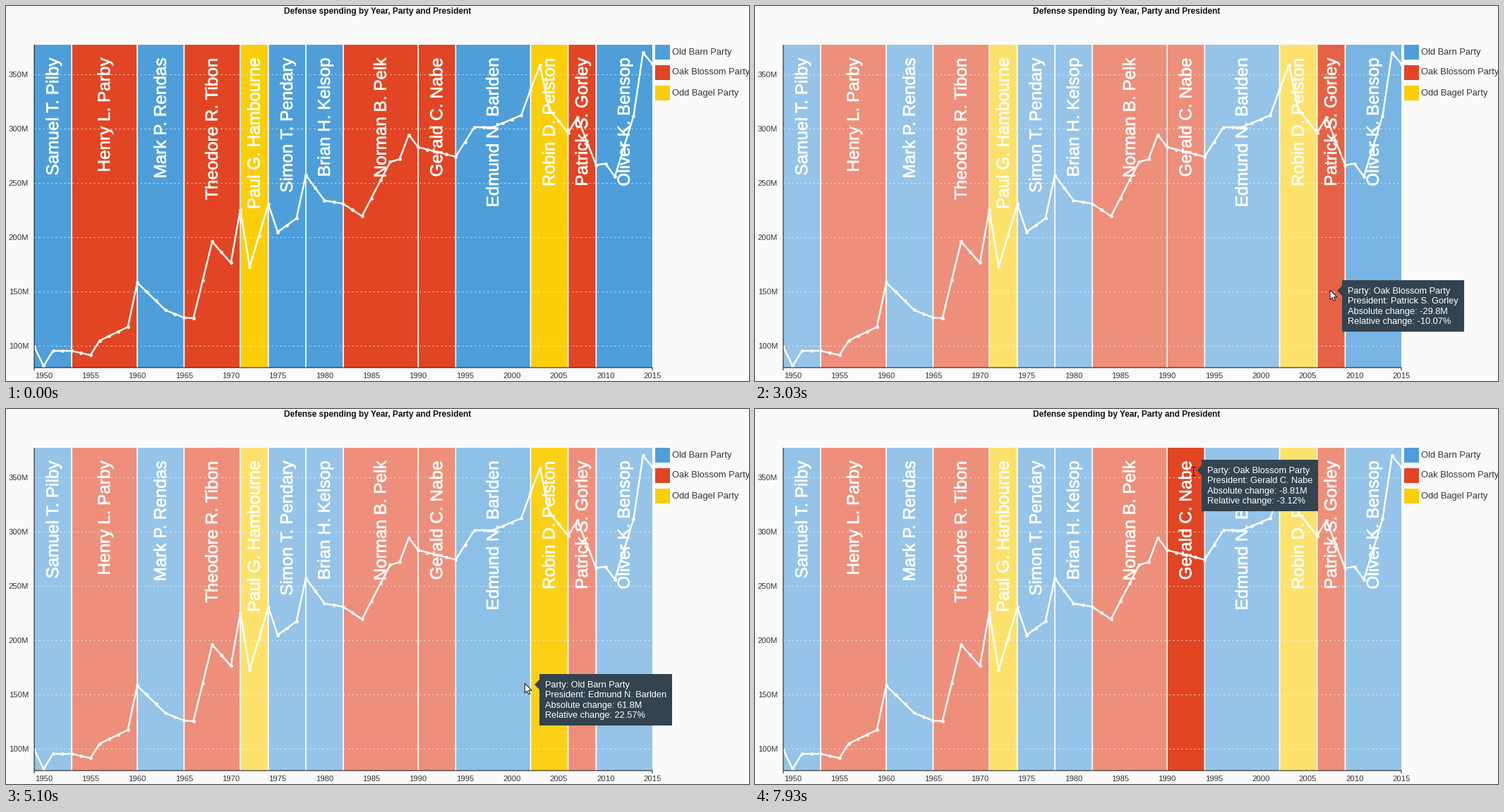
A matplotlib script for the animation above (7.99 s loop, 1053 by 532 pixels).

```python
import numpy as np
import matplotlib.pyplot as plt
from matplotlib.animation import FuncAnimation
from matplotlib.patches import Polygon, Rectangle
from matplotlib.patheffects import withStroke

W, H = 1053, 532
LOOP, STEP = 7990, 47
LEFT, RIGHT, TOP, BOTTOM = 40, 916, 55, 513
FIRST, LAST = 1949, 2015
BLUE, RED, YELLOW = "#4e9eda", "#e14524", "#facf0a"
INK, TEXT, TIP_COLOR = "#111111", "#333333", "#33434f"
DIM, FADE, LAG = 0.6, 400, 45

PARTIES = {BLUE: "Old Barn Party", RED: "Oak Blossom Party",
           YELLOW: "Odd Bagel Party"}

# first year, party colour, president, spending in that year
TERMS = [
    (1949, BLUE, "Samuel T. Pilby", 99),
    (1953, RED, "Henry L. Parby", 95),
    (1960, BLUE, "Mark P. Rendas", 157.8),
    (1965, RED, "Theodore R. Tibon", 125.6),
    (1971, YELLOW, "Paul G. Hambourne", 225),
    (1974, BLUE, "Simon T. Pendary", 229.9),
    (1978, BLUE, "Brian H. Kelsop", 256.8),
    (1982, RED, "Norman B. Pelk", 230.5),
    (1990, RED, "Gerald C. Nabe", 282.63),
    (1994, BLUE, "Edmund N. Barlden", 273.82),
    (2002, YELLOW, "Robin D. Pelston", 335.63),
    (2006, RED, "Patrick S. Gorley", 295.84),
    (2009, BLUE, "Oliver K. Bensop", 266.06),
]

# turning points inside the terms; years between them lie on straight lines
TURNS = {
    1950: 81, 1951: 95, 1955: 91, 1956: 104.5, 1959: 117, 1963: 132.5,
    1966: 125, 1968: 195.5, 1970: 176, 1972: 172.5, 1975: 204.5, 1977: 217,
    1980: 233.5, 1984: 219, 1987: 269, 1988: 271.5, 1989: 294, 1996: 301,
    1998: 301, 2001: 312, 2003: 358, 2004: 317.5, 2007: 310, 2010: 267.5,
    2011: 255.5, 2013: 311.5, 2014: 369.5, LAST: 359.44,
}
spending = sorted({**TURNS, **{t[0]: t[3] for t in TERMS}}.items())

# pointer path: ms, x, y
PATH = np.array([
    (970, 950, 520), (2140, 894, 429), (3030, 815, 403), (4660, 763, 396),
    (5040, 745, 391), (5660, 644, 373), (5980, 609, 362), (7170, 609, 362),
    (7840, 620, 87),
])
ARROW = 0.85 * np.array([
    (0, 0), (0, 16), (3.7, 12.6), (6.3, 18.3), (8.8, 17.2), (6.3, 11.6),
    (11.5, 11.6),
])
IBEAM = np.array([(-3, -6), (3, -6), (0, -6), (0, 6), (-3, 6), (3, 6)])

plt.rcParams["font.family"] = "Liberation Sans"
fig = plt.figure(figsize=(W / 72, H / 72), dpi=72, facecolor="#fafafa")
ax = fig.add_axes([0, 0, 1, 1])
ax.set_xlim(0, W)
ax.set_ylim(H, 0)
ax.axis("off")


def year_x(year):
    return LEFT + (RIGHT - LEFT) * (year - FIRST) / (LAST - FIRST)


def value_y(value):
    return 96.5 + (350 - value) * 1.54


def spent(year):
    return np.interp(year, *zip(*spending))


def pointer(t):
    return np.array([np.interp(t, PATH[:, 0], PATH[:, k]) for k in (1, 2)])


def label(x, y, text, size, color=TEXT, **kw):
    return ax.text(x, y, text, fontsize=size, color=color, va="baseline", **kw)


def box(x, y, w, h, color, z=1):
    return ax.add_patch(Rectangle((x, y), w, h, fc=color, lw=0, zorder=z))


def stroke(xs, ys, color, lw, z, **kw):
    ax.plot(xs, ys, color=color, lw=lw, zorder=z, solid_capstyle="butt", **kw)


# bands with vertical names
box(LEFT, TOP, RIGHT - LEFT, BOTTOM - TOP, "white", 0)
ends = [term[0] for term in TERMS[1:]] + [LAST]
bands = []
for (start, color, name, _), end in zip(TERMS, ends):
    x0, x1 = year_x(start), year_x(end)
    bands.append(box(x0, TOP, x1 - x0, BOTTOM - TOP, color))
    label((x0 + x1) / 2 + 7.5, 74, name, 24.3, "white", ha="right",
          rotation=90, rotation_mode="anchor", zorder=4,
          path_effects=[withStroke(linewidth=0.6, foreground="white")])
    if end < LAST:
        stroke([x1, x1], [TOP, BOTTOM], "white", 1.7, 2, snap=False)

# grid, data line and axes
for value in range(100, 351, 50):
    y = value_y(value)
    stroke([LEFT, RIGHT], [y, y], "white", 1, 3, alpha=0.75,
           linestyle=(0, (2, 4)))
    label(32, y + 4.5, f"{value}M", 11.2, ha="right")
for year in range(1950, LAST + 1, 5):
    label(year_x(year), 528, str(year), 11.2, ha="center")

years = np.arange(FIRST, LAST + 1)
ax.plot(year_x(years), value_y(spent(years)), color="white", lw=2.4,
        marker="o", ms=4.8, mew=0, solid_joinstyle="round", zorder=5)
stroke([LEFT, LEFT], [TOP, BOTTOM + 4], INK, 1, 6, snap=False)
stroke([LEFT, RIGHT, RIGHT], [BOTTOM, BOTTOM, BOTTOM + 4], INK, 1, 6,
       snap=False)

# title and legend
label(526.5, 11, "Defense spending by Year, Party and President", 11.9, INK,
      ha="center", weight="bold")
for k, (color, party) in enumerate(PARTIES.items()):
    box(920, TOP + 29 * k, 21, 21, color)
    label(943.5, 68.5 + 29 * k, party, 12.9)

# tooltip and pointer
tip = ax.add_patch(Polygon([(0, 0), (1, 0), (1, 1)], fc=TIP_COLOR, lw=0,
                           zorder=8))
tip_lines = [label(0, 0, "", 12.8, "white", zorder=9) for _ in range(4)]
arrow = ax.add_patch(Polygon(ARROW, fc="white", ec=INK, lw=1, zorder=10))
ibeam, = ax.plot([], [], color="#222222", lw=1, zorder=10)

# the pointer moves left, entering each band over its right edge
leftward = PATH[:7]
hovers = []
for term in reversed(range(len(TERMS))):
    edge = year_x(ends[term])
    if edge > leftward[-1, 1]:
        hovers.append((np.interp(-edge, -leftward[:, 1], leftward[:, 0]), term))


def show_tooltip(term, t):
    start, color, name, before = TERMS[term]
    change = spent(ends[term]) - before
    rows = [f"Party: {PARTIES[color]}", f"President: {name}",
            f"Absolute change: {change:.3g}M",
            f"Relative change: {change / before:.2%}"]
    x, y = np.round(pointer(t - LAG) + (13, -15))
    for k, (line, row) in enumerate(zip(tip_lines, rows)):
        line.set_text(row)
        line.set_position((x + 8, y + 19 + 14.4 * k))
    w = round(max(line.get_window_extent().width for line in tip_lines)) + 16
    tip.set_xy([(x, y), (x + w, y), (x + w, y + 73), (x, y + 73),
                (x, y + 22), (x - 7, y + 15), (x, y + 8)])


def update(i):
    t = (i + 0.5) * STEP
    alpha = np.ones(len(bands))
    current = None
    for start, term in hovers:
        if t >= start:
            current = term
            goal = np.where(np.arange(len(bands)) == term, 1, DIM)
            alpha += (goal - alpha) * min(1, (t - start) / FADE)
    for band, a in zip(bands, alpha):
        band.set_alpha(a)

    for part in [tip, *tip_lines]:
        part.set_visible(current is not None)
    if current is not None:
        show_tooltip(current, t)

    spot = pointer(t)
    over_text = spot[1] < 242
    arrow.set_visible(t >= PATH[0, 0] and not over_text)
    arrow.set_xy(spot + ARROW)
    ibeam.set_visible(over_text)
    ibeam.set_data(*(np.round(spot) + 0.5 + IBEAM).T)


anim = FuncAnimation(fig, update, frames=LOOP // STEP, interval=STEP,
                     init_func=lambda: update(0), repeat=True, repeat_delay=0)
plt.show()
```
